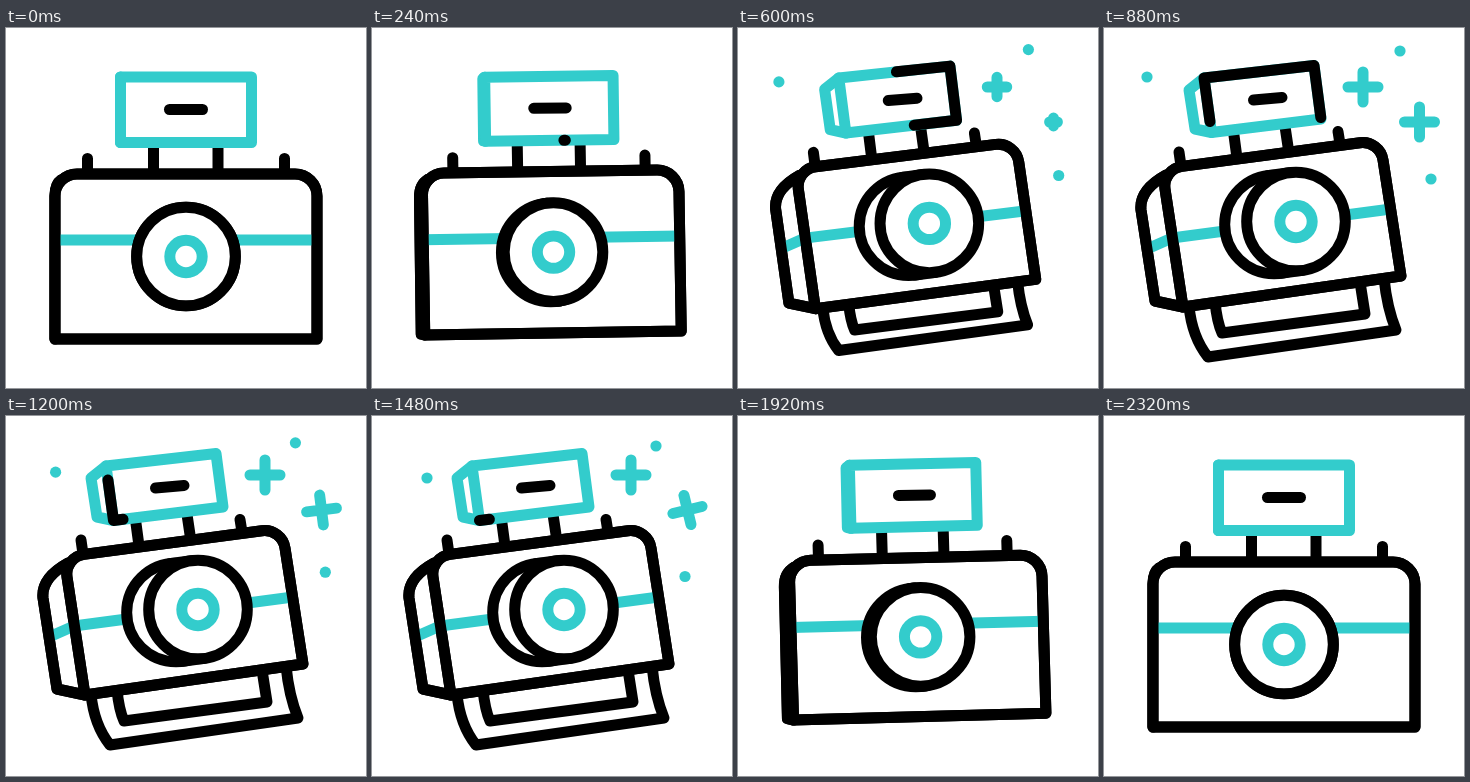
Write an HTML page that moves like this. It is 360 px wide and 360 px high and loops after 2600 ms.

```html
<!DOCTYPE html>
<html lang="en">
<head>
<meta charset="utf-8">
<title>Instant camera</title>
<style>
html, body { margin: 0; width: 100%; height: 100%; overflow: hidden; background: #fff; }
svg { display: block; width: 100vw; height: 100vh; }
path, circle { fill: none; stroke: #000; stroke-width: 11; stroke-linecap: round; stroke-linejoin: round; }
.cyan { stroke: #33cccc; }
.white { fill: #fff; }
.flat { stroke-linecap: butt; }
.dot { fill: #33cccc; stroke: none; }
</style>
</head>
<body>
<svg id="stage" viewBox="0 0 360 360"></svg>
<script>
const LOOP = 2600, STEP = 40;
const stage = document.getElementById('stage');

function add(tag, cls = '') {
  const el = document.createElementNS('http://www.w3.org/2000/svg', tag);
  el.setAttribute('class', cls);
  stage.append(el);
  return el;
}
function set(el, attrs) {
  for (const k in attrs) el.setAttribute(k, attrs[k]);
}

// Painted back to front
const paper = add('path');
const posts = add('path', 'flat');
const ears = add('path');
const side = add('path', 'white');
const face = add('path', 'white');
const stripe = add('path', 'cyan flat');
const edges = add('path');
const barrel = add('circle', 'white');
const tangents = add('path');
const lens = add('circle', 'white');
const ring = add('circle', 'cyan');
const flashSide = add('path', 'cyan white');
const flashFront = add('path', 'cyan white');
const glow = add('path');
const mark = add('path');

// Dot stops follow the times in DOT_TIMES
const DOT_TIMES = [440, 880, 1480, 1800];
const dots = [
  [[40, 56], [43, 49], [55, 62], [45, 68]],
  [[288, 21], [296, 23], [284, 30], [280.5, 22]],
  [[318, 146], [327, 151], [313, 160.5], [314, 144]]
].map(stops => ({ stops, el: add('circle', 'dot') }));
const pluses = [
  { x: 259, y: 59, from: 420, to: 1560, tilt: 0 },
  { x: 315.5, y: 94, from: 500, to: 1664, tilt: -13.5 }
].map(o => ({ ...o, el: add('path', 'cyan') }));

const clamp = v => Math.max(0, Math.min(1, v));
const mix = (a, b, k) => a + (b - a) * k;
const mixPt = (a, b, k) => [mix(a[0], b[0], k), mix(a[1], b[1], k)];
const smooth = v => { v = clamp(v); return v * v * (3 - 2 * v); };

// Cubic bezier easing (.56, 0, .12, 1)
function ease(x) {
  if (x <= 0) return 0;
  if (x >= 1) return 1;
  let lo = 0, hi = 1, s;
  for (let i = 0; i < 24; i++) {
    s = (lo + hi) / 2;
    const r = 1 - s;
    if (3 * r * r * s * .56 + 3 * r * s * s * .12 + s * s * s < x) lo = s; else hi = s;
  }
  return s * s * (3 - 2 * s);
}
const span = (t, start, length) => ease((t - start) / length);

const str = p => p[0].toFixed(2) + ' ' + p[1].toFixed(2);
const line = (...pts) => 'M' + pts.map(str).join('L');
const curve = (c, b) => 'Q' + str(c) + ' ' + str(b);
const corner = (a, c, b) =>
  'C' + str(mixPt(a, c, .55)) + ' ' + str(mixPt(b, c, .55)) + ' ' + str(b);

function drawBody(at) {
  const bl = at(49, 311, 79, 279), br = at(311, 311, 297, 248);
  const l = at(49, 168, 61, 161), tl = at(49, 146, 58, 141), t1 = at(71, 146, 78, 138.4);
  const t2 = at(289, 146, 256, 114.7), tr = at(311, 146, 276, 112), r = at(311, 168, 279, 132);
  const outline = line(bl, l) + corner(l, tl, t1) + 'L' + str(t2) + corner(t2, tr, r) +
    'L' + str(br) + 'Z';
  const flank = line(bl, at(49, 311, 51, 273), at(49, 168, 37, 182)) +
    curve(at(49, 156, 35, 162), at(55, 152, 62, 147));

  set(side, { d: flank });
  set(face, { d: outline });
  set(stripe, { d: line(at(49, 212, 43, 221), at(49, 212, 68, 210), at(311, 212, 287, 181)) });
  set(edges, { d: outline + flank });
  set(posts, {
    d: line(at(147.5, 115, 129, 100), at(147.5, 146, 133, 130)) +
       line(at(212, 115, 180.5, 95), at(212, 146, 184.5, 122))
  });
  set(ears, {
    d: line(at(81.5, 130.5, 75, 124), at(81.5, 146, 77, 138)) +
       line(at(278.5, 130.5, 234, 103.5), at(278.5, 146, 236, 116))
  });
}

function drawLens(at) {
  const R = 49.3;
  const back = at(180, 228.5, 170, 196.5), front = at(180, 228.5, 192, 193.5);
  const dx = front[0] - back[0], dy = front[1] - back[1];
  const len = Math.hypot(dx, dy) || 1;
  const off = (p, s) => [p[0] + s * R * dy / len, p[1] - s * R * dx / len];
  set(barrel, { cx: back[0], cy: back[1], r: R });
  set(lens, { cx: front[0], cy: front[1], r: R });
  set(ring, { cx: front[0], cy: front[1], r: 16.2 });
  set(tangents, {
    d: len > .01 && dx ? line(off(back, 1), off(front, 1)) + line(off(back, -1), off(front, -1)) : ''
  });
}

function drawFlash(at, t) {
  const tl = at(114.5, 49, 100, 50), tr = at(245.5, 49, 210, 37.5);
  const br = at(245.5, 114.5, 217, 91), bl = at(114.5, 114.5, 107.5, 104.5);
  set(flashSide, { d: line(tl, at(114.5, 49, 85, 62), at(114.5, 114.5, 91, 101), bl) });
  set(flashFront, { d: line(tl, tr, br, bl) + 'Z' });
  set(mark, { d: line(at(163.5, 81.5, 149.5, 72), at(196.5, 81.5, 178, 69.5)) });

  // A black stroke runs around the frame, its tail chasing its head
  const head = span(t, 173, 1081), tail = span(t, 534, 1270);
  set(glow, {
    d: line(mixPt(bl, br, .61), br, tr, tl, bl, mixPt(bl, br, .09)),
    pathLength: 1,
    'stroke-dasharray': `${Math.max(0, head - tail)} 3`,
    'stroke-dashoffset': -tail,
    visibility: head - tail > .004 ? 'visible' : 'hidden'
  });
}

function drawPaper(at, q) {
  const move = (p, x, y) => [p[0] + x * q, p[1] + y * q];
  const a = at(81, 311, 85, 278), b = at(272, 311, 280, 250);
  const c = at(106, 311, 111, 274), d = at(248, 311, 256, 254);
  set(paper, {
    d: line(a) + curve(move(a, 3, 31), move(a, 19, 51)) + 'L' + str(move(b, 12, 52)) +
       curve(move(b, 3, 30), b) +
       line(c) + curve(move(c, 2, 20), move(c, 7, 31)) + 'L' + str(move(d, 5, 32)) + 'L' + str(d),
    visibility: q > .03 ? 'visible' : 'hidden'
  });
}

function drawSparkles(t) {
  let i = 0;
  while (i < 2 && t >= DOT_TIMES[i + 1]) i++;
  const k = smooth((t - DOT_TIMES[i]) / (DOT_TIMES[i + 1] - DOT_TIMES[i]));
  const size = smooth((t - 410) / 160) * (1 - smooth((t - 1800) / 110));
  for (const { stops, el } of dots) {
    const p = mixPt(stops[i], stops[i + 1], k);
    set(el, { cx: p[0], cy: p[1], r: 5.6 * size });
  }
  for (const { x, y, from, to, tilt, el } of pluses) {
    const grow = smooth((t - from) / 300) * (1 - smooth((t - to) / 200));
    const arm = 15 * grow;
    const turn = tilt * smooth((t - 900) / 580) * (1 - smooth((t - 1480) / 300));
    set(el, {
      d: `M${-arm} 0H${arm}M0 ${-arm}V${arm}`,
      transform: `translate(${x} ${y}) rotate(${turn})`,
      visibility: grow > .02 ? 'visible' : 'hidden'
    });
  }
}

function draw(time) {
  const t = Math.floor((time % LOOP) / STEP) * STEP;
  const pose = span(t, 40, 800) - span(t, 1520, 800);
  const out = span(t, 360, 440) - span(t, 1570, 440);
  const at = (x0, y0, x1, y1) => [mix(x0, x1, pose), mix(y0, y1, pose)];
  drawPaper(at, out);
  drawBody(at);
  drawLens(at);
  drawFlash(at, t);
  drawSparkles(t);
}

const start = performance.now();
function tick() {
  draw(performance.now() - start);
  requestAnimationFrame(tick);
}
tick();
</script>
</body>
</html>
```
